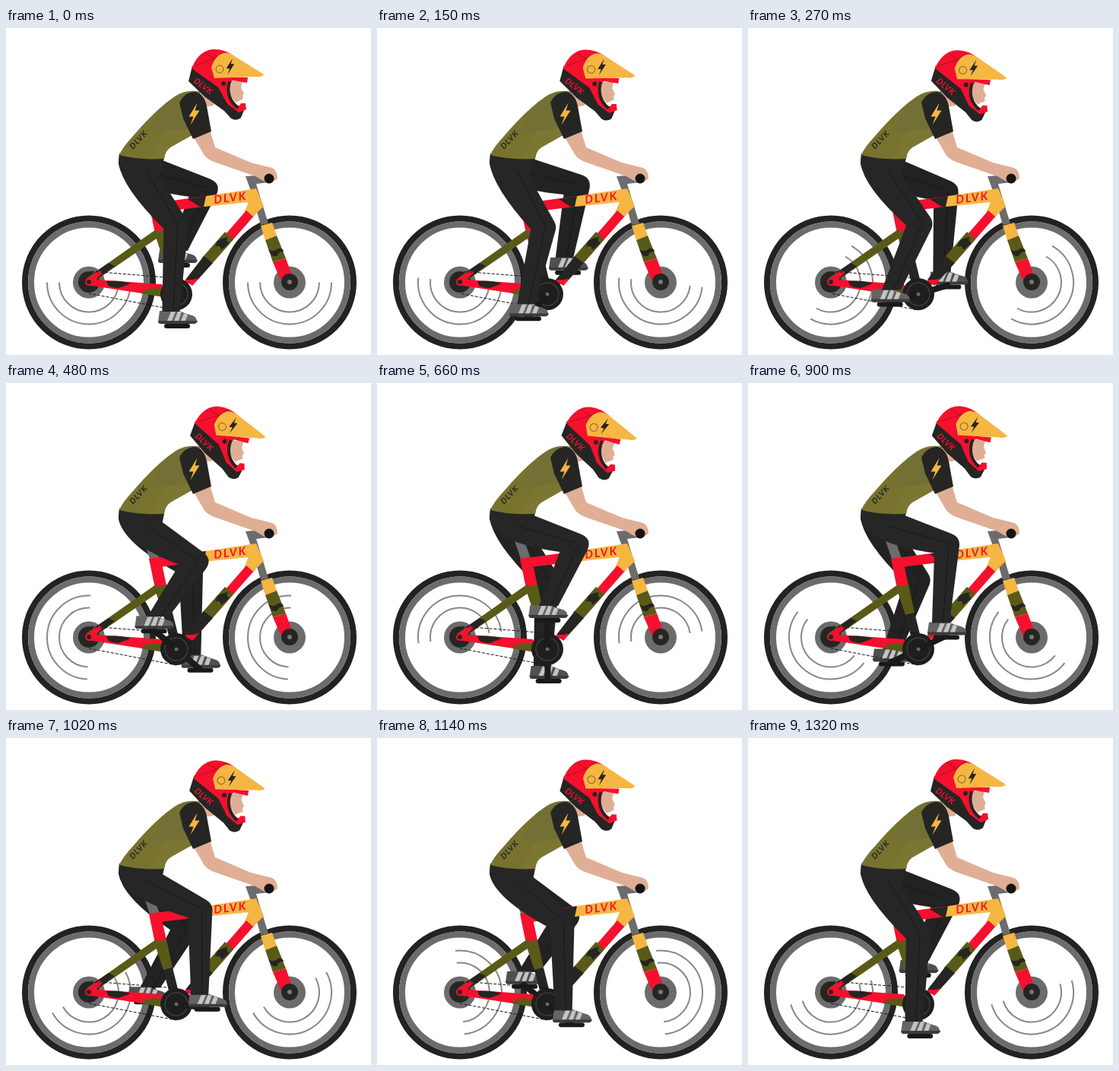
These frames come from a looping animation (480x430 px, 1.35 s). An HTML page:

```html
<!DOCTYPE html>
<html lang="en">
<head>
<meta charset="utf-8">
<title>Cyclist</title>
<style>
  html, body { margin: 0; width: 100%; height: 100%; overflow: hidden; background: #fff; }
  svg { display: block; width: 480px; height: 430px; }
  text { font: italic bold 15px Lato, "Open Sans", sans-serif; letter-spacing: 2px; }
  .red { fill: #f5102d; }
  .olive { fill: #5a5a18; }
  .dark { fill: #252523; }
  .gold { fill: #f5b642; }
  .grey { fill: #6c6c6c; }
  .skin { fill: #dfae95; }
  .near { fill: #262626; }
  .far { fill: #222; }
  .crease { fill: none; stroke: #181818; }
  .arm { stroke: #1b1b1b; stroke-width: 8; stroke-linecap: round; }
  .chain { fill: none; stroke: #151515; stroke-dasharray: 4 2; }
</style>
</head>
<body>
<svg viewBox="0 0 480 430">
  <defs>
    <g id="wheel">
      <circle r="84" fill="none" stroke="#222" stroke-width="8"/>
      <circle r="76" fill="none" stroke="#6c6c6c" stroke-width="8"/>
      <circle r="21" class="grey"/>
    </g>
    <path id="spin" d="M-55 0A55 55 0 0 0 55 0M-39 0A39 39 0 0 0 39 0" fill="none" stroke="#888" stroke-width="2"/>
    <g id="shoe">
      <rect x="-16" y="-1" width="34" height="6" rx="3" fill="#191919"/>
      <path d="M-22-18H4Q13-14 21-12Q27-10 27-4H-24Z"/>
      <path d="M-24-5H28Q27-1 23-1H-21Q-24-1-24-5Z" fill="#3b3b3b"/>
      <path d="M-7-17h6l-5 12h-6zM2-17h5l-4 12h-6zM10-15l5 2-3 8h-6z" fill="#c4c4c4"/>
    </g>
    <path id="bolt" d="M4-15L-7 3H-1L-5 14L7-5H1Z"/>
  </defs>

  <use href="#wheel" x="109" y="334.500"/>
  <use href="#wheel" x="373" y="334.500"/>
  <use href="#spin" class="spin" data-x="109"/>
  <use href="#spin" class="spin" data-x="373"/>
  <circle cx="109" cy="334" r="14" class="dark"/>

  <g id="farLeg">
    <path class="far leg"/>
    <path class="crease"/>
    <use href="#shoe" class="foot" fill="#505050"/>
  </g>
  <line id="farArm" class="arm" x1="224" y1="350"/>

  <!-- steerer, stem and fork -->
  <path class="grey" d="M315 195L340 193L345 203L329 205L345 257L335 259L322 214Z"/>
  <path class="gold" d="M335 260L350 256L356 273L341 279Z"/>
  <path class="olive" d="M341 279L356 273L368 303L351 308Z"/>
  <path class="dark" d="M345 291Q352 296 358 290Q364 289 365 294Q358 294 357 299Q352 302 349 298Z"/>
  <path class="red" d="M351 308L368 303L377 328L361 331Z"/>
  <circle cx="373" cy="334" r="11" class="dark"/>
  <circle cx="373" cy="334" r="3" fill="#777"/>

  <!-- frame -->
  <path class="grey" d="M180 205L192 202L202 231L190 234Z"/>
  <path class="red" d="M188 231L203 229L211 266L196 270Z"/>
  <path class="olive" d="M195 269L211 265L219 302L207 305Z"/>
  <path class="dark" d="M207 305L219 302L228 338L216 340Z"/>
  <path class="olive" d="M106 329L197 265L205 272L112 336Z"/>
  <path class="dark" d="M117 321L135 309L143 313L120 330Z"/>
  <path class="red" d="M105 331L122 319L128 321L112 337Z"/>
  <path class="red" d="M106 330L205 337L212 354L107 338Z"/>
  <path class="dark" d="M132 333Q150 331 164 336L148 342Q136 341 134 338Z"/>
  <path class="olive" d="M177 349Q184 340 204 343L208 354Z"/>
  <circle cx="109" cy="334" r="5" class="red"/>
  <circle cx="109" cy="334" r="3" class="dark"/>
  <path class="red" d="M189 231L263 221L260 235L194 243Z"/>
  <path class="dark" d="M239 225L264 221L260 235L255 235Z"/>
  <path class="gold" d="M263 221L329 211L339 234L323 249L313 243L319 229L260 235Z"/>
  <path class="red" d="M316 240L328 245L246 338L234 334Z"/>
  <path class="olive" d="M288 268L299 278L269 312L258 302Z"/>
  <path class="dark" d="M278 280Q276 284 275 288Q282 284 283 292L294 283Q288 279 292 275Q284 276 278 280ZM260 300L272 309L252 331L236 331Z"/>
  <path class="red" d="M238 333L253 329L245 339Z"/>
  <path class="gold" d="M315 239L330 228L339 234L325 248Z"/>
  <text class="red" transform="translate(274 231) rotate(-7)">DLVK</text>

  <path class="chain" d="M112 320L224 329"/>
  <path class="chain" d="M224 371L109 349"/>
  <circle cx="224" cy="350" r="21" fill="#1e1e1e"/>
  <circle cx="224" cy="350" r="15" fill="none" stroke="#3c3c3c" stroke-width="1.500"/>
  <line id="nearArm" class="arm" x1="224" y1="350"/>
  <circle cx="224" cy="350" r="2.500" fill="#666"/>

  <g id="nearLeg">
    <use href="#shoe" class="foot" fill="#646464"/>
    <path class="near leg"/>
    <path class="crease"/>
  </g>

  <!-- head -->
  <path class="skin" d="M252 82L275 90L273 102L261 104Z"/>
  <g id="head">
    <path class="skin" d="M294 70H311L309 78L313 86L311 89L312 93L302 98L293 86Z"/>
    <path class="dark" d="M245 50L275 66L296 71Q289 84 298 97L313 108L309 118Q303 123 296 119L287 109L262 91L240 70Z"/>
    <path class="red" d="M244 53L248 45Q258 28 274 28Q288 28 300 37L274 65L318 65L317 72L298 69Q291 75 294 86L298 97Q303 103 307 102L309 99L315 99L316 107L306 111L291 100L279 78Z"/>
    <path d="M294 70Q288 91 305 105" fill="none" stroke="#252523" stroke-width="4"/>
    <path d="M249 50L274 40L286 31M262 33L274 40" fill="none" stroke="#b60d24"/>
    <path class="gold" d="M270 52Q275 36 286 33Q294 32 302 38L339 61Q336 65 328 64L274 66Z"/>
    <circle cx="281" cy="54" r="5" fill="none" stroke="#8a6420"/>
    <use href="#bolt" class="dark" transform="translate(295 51) scale(.75)"/>
    <circle cx="286" cy="73" r="3" class="dark"/>
    <text class="red" transform="translate(246 71) rotate(37)" style="font-size:11px;letter-spacing:.5px">DLVK</text>
  </g>

  <!-- torso and arm -->
  <path fill="#77732f" d="M149 167Q153 157 168 141Q197 107 222 90Q238 80 255 84L248 139L216 157Q209 162 208 172Q174 174 149 167Z"/>
  <path fill="#727035" d="M190 134L211 98L237 84L230 105L240 132L208 136Z"/>
  <path fill="#7b7733" d="M190 171L209 136L240 132L246 140L216 157Q209 162 208 172Z"/>
  <text class="dark" transform="translate(167 160) rotate(-47)" style="font-size:10.500px;letter-spacing:1px">DLVK</text>
  <path class="skin" d="M246 142L268 134L275 157L322 177L350 184Q357 187 357 198L350 203L340 202L328 195L276 177Q264 173 260 166Z"/>
  <path class="dark" d="M228 98Q235 84 249 84Q261 87 264 103L270 136L246 146L233 119Z"/>
  <use href="#bolt" class="gold" transform="translate(247.500 113.500)"/>
  <circle cx="346" cy="198" r="6.500" fill="#151515"/>
</svg>
<script>
  const LOOP = 1350, STEP = 30, CRANK_STEP = 8.14, GEAR = 9;
  const HIP = [172, 178], AXLE = [224, 350], CRANK = 40, THIGH = 96.6, KNEE = 16, CUFF = 11.5;
  const rad = Math.PI / 180;
  const $ = id => document.getElementById(id);
  const add = (p, v, k = 1) => [p[0] + v[0] * k, p[1] + v[1] * k];
  const pt = p => p.map(v => v.toFixed(2)).join(' ');

  // Unit normal on the front side of a limb running from a to b
  function front(a, b) {
    const x = b[0] - a[0], y = b[1] - a[1], len = Math.hypot(x, y);
    return [y / len, -x / len];
  }

  function drawLeg(leg, arm, deg) {
    const pedal = add(AXLE, [-Math.sin(deg * rad), Math.cos(deg * rad)], CRANK);
    const swing = (39.5 + 21.5 * Math.cos((deg - 32) * rad)) * rad;
    const dir = [Math.cos(swing), Math.sin(swing)];
    const knee = add(HIP, dir, THIGH);
    const cuff = add(pedal, [-7 + 0.24 * (knee[0] - pedal[0]), -17]);
    const n = front(HIP, knee), m = front(knee, cuff);
    const bend = KNEE / (1 + n[0] * m[0] + n[1] * m[1]);
    const corner = add(n, m);
    const back = add(knee, corner, -bend);
    const groin = add(add(HIP, n, KNEE), dir, 30);
    const hem = [CUFF / m[0], 0];
    leg.querySelector('.leg').setAttribute('d',
      `M149 165L208 171L${pt(groin)}L${pt(add(knee, n, KNEE))}Q${pt(add(knee, corner, bend))} ${pt(add(knee, m, KNEE))}` +
      `L${pt(add(cuff, hem))}L${pt(add(cuff, hem, -1))}L${pt(back)}Q153 210 148 178Z`);
    leg.querySelector('.crease').setAttribute('d',
      `M184 188L${pt(add(knee, n, 3))}M${pt(add(knee, m, 2))}L${pt(add(cuff, m, 3))}`);
    leg.querySelector('.foot').setAttribute('transform', `translate(${pt(pedal)})`);
    arm.setAttribute('x2', pedal[0]);
    arm.setAttribute('y2', pedal[1]);
  }

  const wheels = document.querySelectorAll('.spin');
  const chains = document.querySelectorAll('.chain');

  function draw() {
    const deg = Math.floor(performance.now() % LOOP / STEP) * CRANK_STEP;
    drawLeg($('nearLeg'), $('nearArm'), deg);
    drawLeg($('farLeg'), $('farArm'), deg + 180);
    for (const w of wheels)
      w.setAttribute('transform', `translate(${w.dataset.x} 334.5) rotate(${deg * GEAR})`);
    for (const c of chains) c.setAttribute('stroke-dashoffset', -deg * rad * 21);
    const nod = 3.7 * (1 - Math.cos(deg * rad));
    $('head').setAttribute('transform', `rotate(${nod} 249 89)`);
    requestAnimationFrame(draw);
  }
  draw();
</script>
</body>
</html>
```
